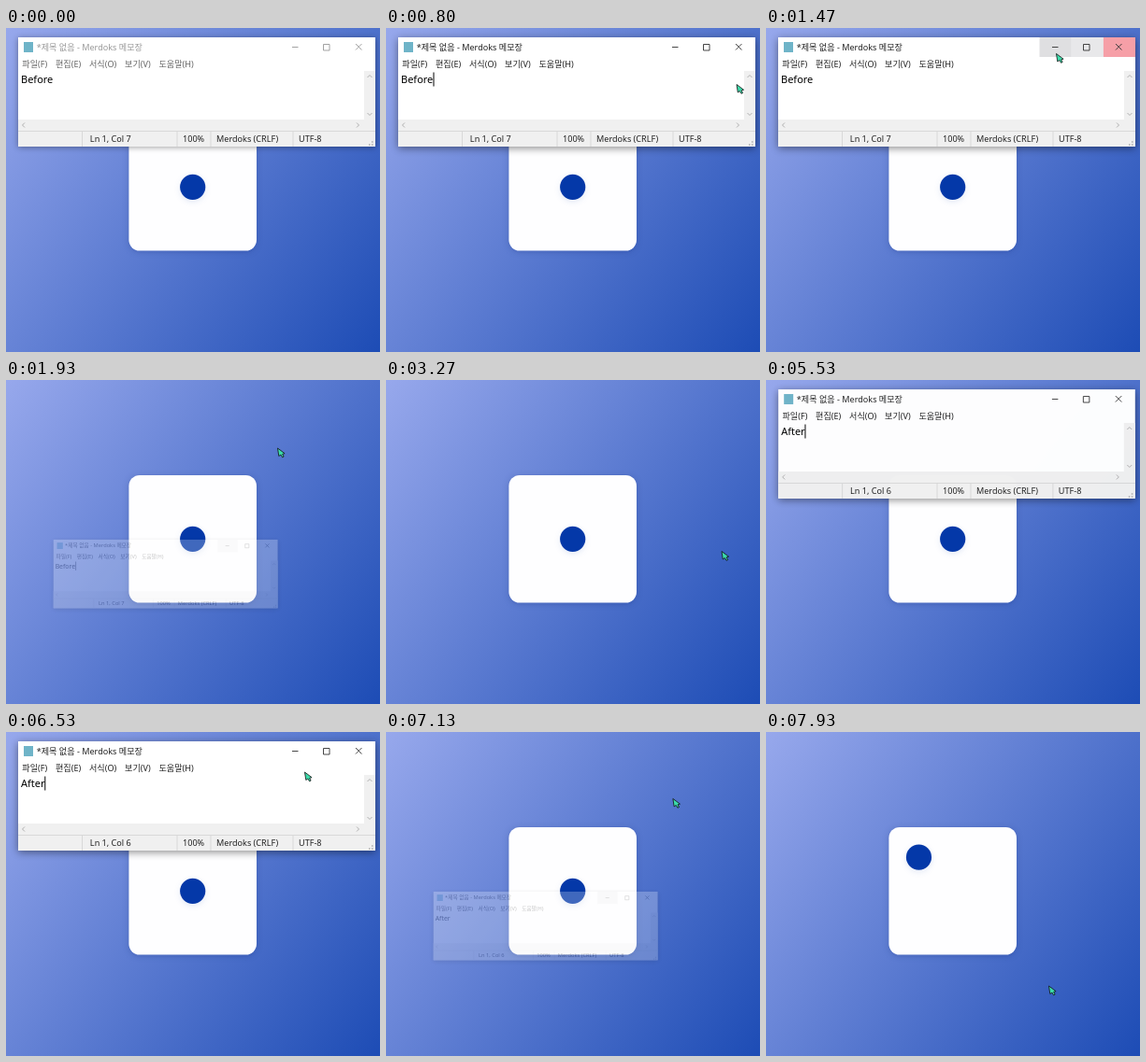
These frames come from a looping animation (400 px wide and 347 px high, 8000 ms). An HTML page:

```html
<!DOCTYPE html>
<html lang="ko">
<head>
<meta charset="utf-8">
<style>
html, body { margin: 0; width: 100%; height: 100%; overflow: hidden; }
body { background: linear-gradient(127deg, #97a8ec, #1d4cb5); }
svg { display: block; width: 400px; height: 347px; }
text { font: 9.1px "Noto Sans", "Noto Sans CJK KR", "Noto Sans CJK", sans-serif; fill: #222; white-space: pre; }
#menu { word-spacing: 6.4px; }
#note { font-size: 11px; fill: #000; }
.icons { fill: none; stroke: #333; stroke-width: .9; }
.inactive .title { fill: #999; }
.inactive .icons { stroke: #999; }
.inactive #menu { fill: #666; }
#card { filter: drop-shadow(0 1px 3px #0a246a40); }
#dot { filter: drop-shadow(0 2px 3px #0438a81c); }
#frame { filter: drop-shadow(0 2px 4px #0007); }
.inactive #frame { filter: drop-shadow(0 1px 3px #0006); }
</style>
</head>
<body>
<svg viewBox="0 0 400 347">
  <rect id="card" x="131.400" y="102" width="136.600" height="136.600" rx="11.500" fill="#fefeff"/>
  <circle id="dot" r="13.600" fill="#0438a8"/>

  <g id="win">
    <rect id="frame" x="13" y="10" width="382" height="116.600" fill="#fff"/>
    <rect x="19" y="15" width="10" height="11" fill="#6fb4c8"/>
    <text class="title" x="32.700" y="23.500">*제목 없음 - Merdoks 메모장</text>
    <g id="buttons"></g>
    <path class="icons" d="M306 20.500h6.500M339.500 17.500h6.500v6.500h-6.500zM374 17l6.500 6.500m0-6.500l-6.500 6.500"/>
    <text id="menu" x="17.300" y="41.500">파일(F) 편집(E) 서식(O) 보기(V) 도움말(H)</text>
    <path d="M383 46h12v81H13V98h370z" fill="#f0f0f0"/>
    <path d="M386.500 53l2.500-2.500 2.500 2.500m-5 38l2.500 2.500 2.500-2.500M20 101.500l-2.500 2.500 2.500 2.500m355-5l2.500 2.500-2.500 2.500" fill="none" stroke="#b0b0b0"/>
    <path d="M13 110.500h382" stroke="#d8d8d8"/>
    <path d="M388 125h1.500m1.500 0h1.500m-1.500-3h1.500" stroke="#aaa" stroke-width="1.500"/>
    <g id="status"></g>
    <text id="note" x="16" y="59.200"></text>
    <path id="caret" d="M0 47.500v15" stroke="#000"/>
  </g>

  <path id="cursor" d="M0 .5L7.600 6.200 5.200 6.800 6.600 9.600 5 10.300 3.400 7.500 1.300 9z" fill="#3cdcab" stroke="#111" stroke-width=".8" stroke-linejoin="round"/>
</svg>
<script>
const $ = id => document.getElementById(id);
const set = (el, name, value) => el.setAttribute(name, value);
const clamp = v => Math.max(0, Math.min(1, v));
const within = (v, a, b) => v >= a && v < b;
const smooth = u => u * u * (3 - 2 * u);
const easeOut = u => 1 - (1 - u) ** 2;
const LOOP = 8000, STEP = 200 / 3;

// Title bar buttons share one width and sit side by side from the left edge.
const BUTTON_X = 292.5, BUTTON_W = 34.2;
$("buttons").innerHTML = ["#dfdfe1", "#dfdfe1", "#e81123"].map((fill, i) =>
  `<rect x="${BUTTON_X + i * BUTTON_W}" y="10" width="${BUTTON_W}" height="21" fill="${fill}"/>`).join("");
const buttons = [...$("buttons").children];

$("status").innerHTML = [[87.5, " "], [189, "100%"], [225, "Merdoks (CRLF)"], [313, "UTF-8"]].map(([x, label]) =>
  `<path d="M${x - 6} 111v16" stroke="#d8d8d8"/><text x="${x}" y="122">${label}</text>`).join("");
const position = $("status").querySelector("text");

// Pointer moves: start, duration, destination. It enters and leaves at the right edge.
const moves = [
  [60, 740, 375, 60], [1000, 300, 375, 20], [1300, 167, 310.5, 27], [1467, 133, 308, 19],
  [1800, 133, 290.5, 72.5], [1933, 733, 359, 183], [4400, 133, 412, 151],
  [5790, 1, 335, 209], [5800, 733, 319.5, 42.5], [6533, 267, 308, 19], [6970, 560, 302.5, 271.5]
];

function pointer(t) {
  return moves.reduce(([x, y], [start, duration, toX, toY]) => {
    const u = smooth(clamp((t - start) / duration));
    return [x + (toX - x) * u, y + (toY - y) * u];
  }, [405, 222]);
}

// A button lights up at once and fades for 200 ms after the pointer leaves it.
function hover(t, index) {
  const left = BUTTON_X + index * BUTTON_W;
  for (let ago = 0; ago < 200; ago += 10) {
    const [x, y] = pointer(t - ago);
    if (within(x, left, left + BUTTON_W) && within(y, 10, 31)) return 1 - ago / 200;
  }
  return 0;
}

function drawWindow(t) {
  const after = t > 4600;
  const opened = after ? easeOut(clamp((t - 5300) / 260)) : 1;
  const gone = clamp((t - (after ? 6970 : 1770)) / 203) ** 2;
  const scale = (0.9 + 0.1 * opened) * (1 - 0.575 * gone);
  set($("win"), "opacity", opened * clamp(1 - gone / 0.85));
  set($("win"), "transform",
    `translate(${204 - 51.5 * gone} ${68.5 + 215 * gone}) scale(${scale}) translate(-204 -68.5)`);
  set($("win"), "class", t < 730 ? "inactive" : "");

  const word = after ? "After" : "Before";
  $("note").textContent = word;
  position.textContent = ` Ln 1, Col ${word.length + 1}`;
  const blink = t - (after ? 5400 : 730);
  set($("caret"), "opacity", +(blink >= 0 && blink % 1060 < 530));
  set($("caret"), "transform", `translate(${after ? 41.8 : 51} 0)`);
  buttons.forEach((button, i) => set(button, "opacity", hover(t, i)));
}

function draw(t) {
  drawWindow(t);
  // The dot first jumps to the corner; later it glides there.
  const jumped = within(t, 2660, 3260) || within(t, 3795, 4260);
  const shift = 55 * (jumped ? 1 : easeOut(clamp((t - 7767) / 400)));
  set($("dot"), "transform", `translate(${199.7 - shift} ${170.3 - shift})`);
  set($("cursor"), "transform", `translate(${pointer(t)})`);
}

function tick() {
  const t = performance.now() % LOOP;
  draw(Math.floor((t + 5) / STEP) * STEP % LOOP);
  requestAnimationFrame(tick);
}
tick();
</script>
</body>
</html>
```
